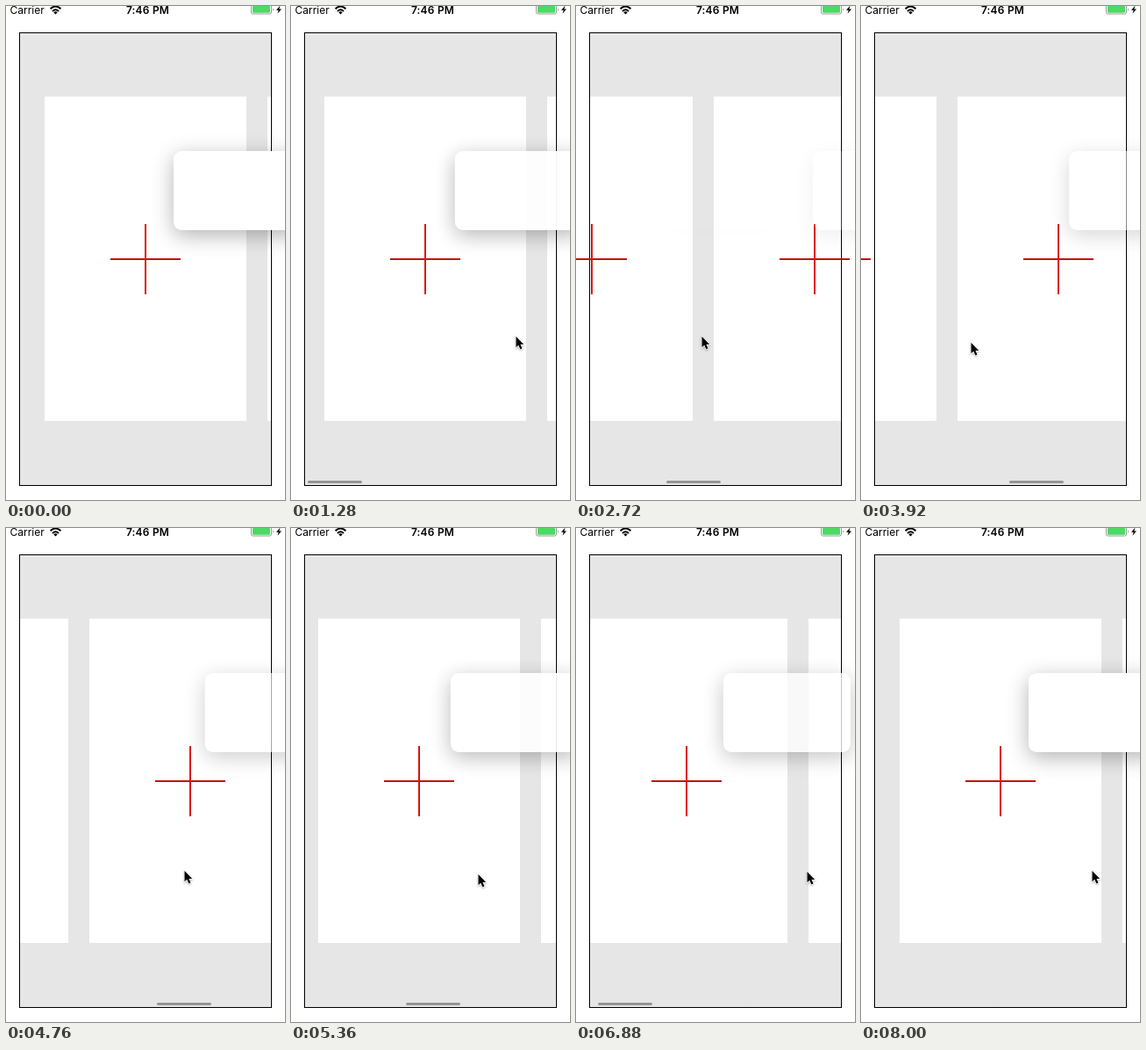
Write an HTML page that moves like this. It is 318x562 px and loops after 8120 ms.

```html
<!DOCTYPE html>
<html lang="en">
<head>
<meta charset="utf-8">
<title>Paged carousel</title>
<style>
  html, body { margin: 0; width: 100%; height: 100%; overflow: hidden; background: #fff; }
  #stage { position: absolute; inset: 0; overflow: hidden; }
  #stage div, #stage svg { position: absolute; }
  #frame { left: 15px; top: 30px; width: 288px; height: 516px; overflow: hidden; background: #e6e6e6; }
  #border { left: 15px; top: 30px; width: 286px; height: 514px; border: 1px solid #000; }
  .cell { left: 29px; top: 73px; width: 230px; height: 369px; background: #fff; }
  .cross { left: 119px; top: 248px; width: 80px; height: 80px; }
  .cross::before, .cross::after { content: ""; position: absolute; }
  .cross::before { left: 0; top: 39px; width: 80px; height: 2px; background: #bc1512; }
  .cross::after { left: 39px; top: 0; width: 2px; height: 80px; background: #dc120e; }
  .card { left: 191px; top: 164.5px; width: 145px; height: 90px; border-radius: 9px;
          background: #fff; box-shadow: 0 6px 24px rgba(0, 0, 0, .3); }
  #bar { left: 18px; top: 540px; width: 62px; height: 3px; border-radius: 2px; background: #949494; }
  #status { left: 0; top: 0; font: 12px Inter, Roboto, sans-serif; }
  #cursor { left: 0; top: 0; overflow: visible; filter: drop-shadow(0 1px 1px rgba(0, 0, 0, .3)); }
</style>
</head>
<body>
<div id="stage">
  <div id="frame"></div>
  <div id="border"></div>
  <div id="bar"></div>
  <svg id="status" width="318" height="14">
    <text x="4.5" y="8.6">Carrier</text>
    <text x="161.5" y="8.6" text-anchor="middle" font-weight="600" letter-spacing=".2">7:46 PM</text>
    <path d="M50.6 3.3Q56.5-2.3 62.4 3.3M53 5.9Q56.5 2.7 60 5.9" fill="none" stroke="#000" stroke-width="2"/>
    <path d="M56.5 9.4 54.3 7.2Q56.5 5.4 58.7 7.2Z"/>
    <rect x="279.5" y="-1" width="23" height="10" rx="2" fill="#fff" stroke="#999"/>
    <rect x="281" y="0" width="20" height="7.7" rx="1" fill="#4cd964"/>
    <path d="M304 2.5Q306 4 304 5.8Z" fill="#999"/>
    <path d="M312.5-.5 308 4.8H310.7L309.5 8.8 314 3.4H311.3Z"/>
  </svg>
  <svg id="cursor" width="12" height="18">
    <path transform="translate(.5 2) scale(.87)" d="M0 0V14.2L3.2 11.2 5.6 16.6 8 15.6 5.7 10.3H10Z"
          stroke="#fff" stroke-width="1.6" paint-order="stroke"/>
  </svg>
</div>
<script>
const LOOP = 8120, STEP = 40, PITCH = 254, PAGES = 5, LAST_FORWARD = 3;
const POINTER_IN = 280;
// Each swipe runs until the next one begins; the last value ends the scrolling.
const bounds = [1236, 2404, 3386, 4592, 5657, 6507, 7150];
const lastSwipe = bounds.length - 2;

const $ = id => document.getElementById(id);
const clamp = v => Math.min(1, Math.max(0, v));
const mix = (a, b, p) => a + (b - a) * p;
const ramp = (t, start, length) => {
  const p = clamp((t - start) / length);
  return p * p * (3 - 2 * p);
};

// cubic-bezier(.25, .1, .25, 1)
function ease(x) {
  let lo = 0, hi = 1;
  for (let i = 0; i < 22; i++) {
    const s = (lo + hi) / 2;
    if (.75 * s * (1 - s) + s ** 3 < x) lo = s; else hi = s;
  }
  return .3 * lo * (1 - lo) ** 2 + 3 * lo * lo * (1 - lo) + lo ** 3;
}

function swipeAt(t) {
  const later = bounds.filter(b => b <= t).length - 1;
  const index = Math.min(lastSwipe, Math.max(0, later));
  const start = bounds[index];
  return { index, p: clamp((t - start) / (bounds[index + 1] - start)) };
}

const pageAfter = n => LAST_FORWARD - Math.abs(LAST_FORWARD - n);

function scrollAt({ index, p }) {
  return Math.round(PITCH * mix(pageAfter(index), pageAfter(index + 1), ease(p)));
}

// The hand drags and comes back once per swipe, and stays out after the last.
function pointerAt(t, { index, p }) {
  const turn = ramp(t, 3950, 640);
  const phase = Math.min(p ** .85, index === lastSwipe ? .5 : 1);
  const x = mix(193, 215, turn) + mix(68, -48, turn) * Math.cos(2 * Math.PI * phase);
  const y = 374 + 20 * ramp(t, 2700, 3200) - 6 * ramp(t, 6200, 1000);
  const arrive = ramp(t, POINTER_IN, 600);
  return [mix(304, x, arrive), mix(419, y, arrive)];
}

function add(name, parent, before = null) {
  const el = document.createElement("div");
  el.className = name;
  return parent.insertBefore(el, before);
}

const pages = Array.from({ length: PAGES }, () => ({
  cell: add("cell", $("frame")),
  cross: add("cross", $("stage"), $("bar")),
  card: add("card", $("stage"), $("bar"))
}));

const move = (el, x, y = 0) => { el.style.transform = `translate(${x}px, ${y}px)`; };

function draw(t) {
  const swipe = swipeAt(t);
  const scroll = scrollAt(swipe);
  pages.forEach(({ cell, cross, card }, i) => {
    const shift = i * PITCH - scroll;
    move(cell, shift);
    move(cross, shift);
    move(card, shift * .7);
    card.style.opacity = clamp(1 - Math.abs(shift) / 144);
  });
  move($("bar"), Math.round(scroll * 282 / 1304));
  $("bar").style.opacity = t < bounds[0] ? 0 : clamp((7760 - t) / 320);
  move($("cursor"), ...pointerAt(t, swipe).map(Math.round));
  $("cursor").style.visibility = t < POINTER_IN ? "hidden" : "visible";
}

const began = performance.now();
function tick() {
  const t = (performance.now() - began) % LOOP;
  draw(Math.floor(t / STEP) * STEP);
  requestAnimationFrame(tick);
}
tick();
</script>
</body>
</html>
```
